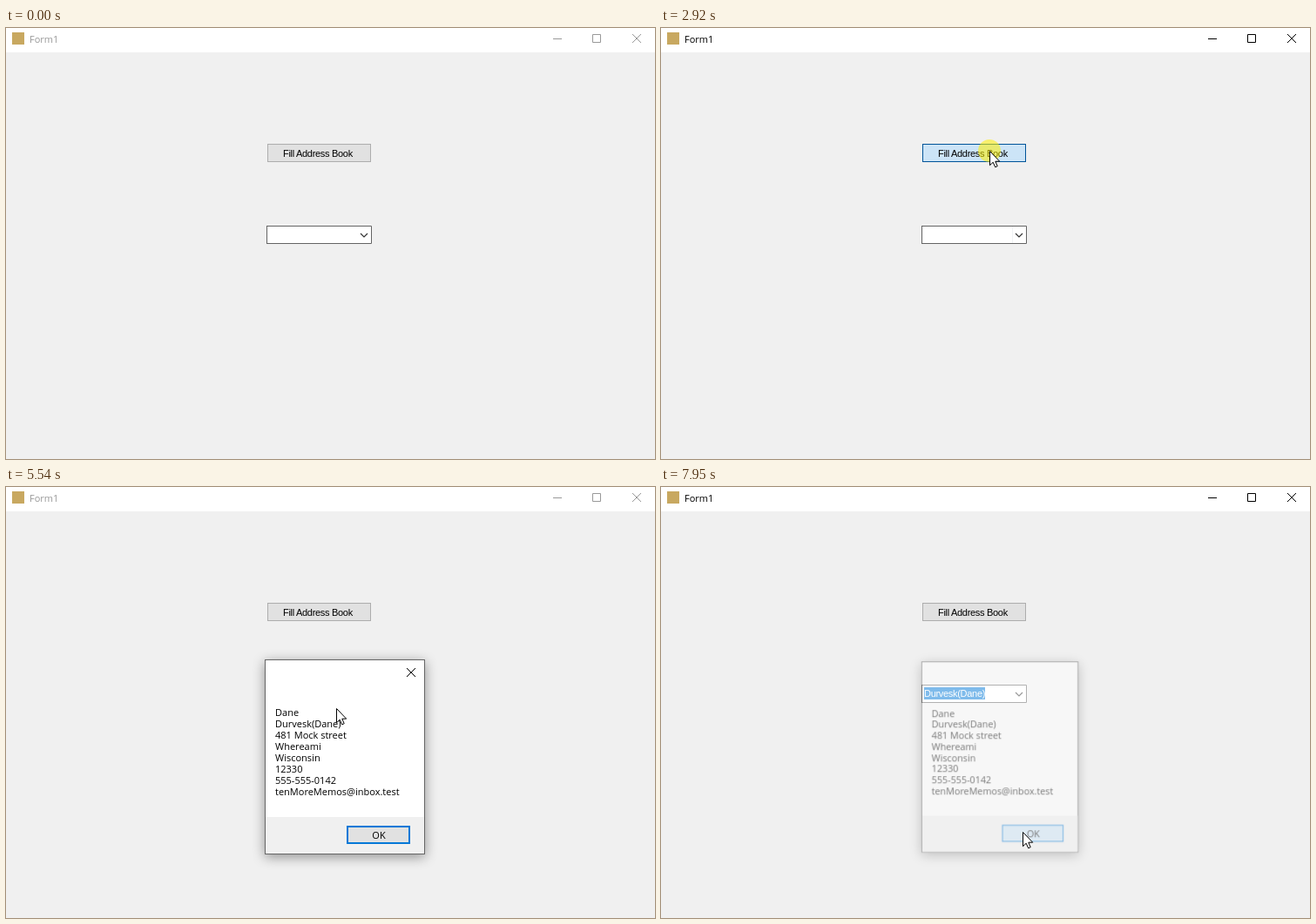
Write an HTML page that moves like this. It is 745 px wide and 495 px high and loops after 8 s.

```html
<!DOCTYPE html>
<html lang="en">
<head>
<meta charset="utf-8">
<title>Form1</title>
<style>
  html, body { margin: 0; width: 100%; height: 100%; overflow: hidden; background: #f0f0f0; }
  svg { display: block; width: 100vw; height: 100vh; }
  text { font: 11px "Open Sans", "Noto Sans", sans-serif; white-space: pre; }
  .control { font: 11px "Liberation Sans", Arial, sans-serif; letter-spacing: -.3px; }
  .line { fill: none; stroke: currentColor; }
  #dropdown, #dialog, #halo, #selection, #cursor { opacity: 0; }
  #dropdown { filter: drop-shadow(2.5px 2.5px 1px rgba(0, 0, 0, .55)); }
  #dialog { transform-origin: 389px 310px; filter: drop-shadow(0 3px 7px rgba(0, 0, 0, .4)); }
</style>
</head>
<body>
<svg viewBox="0 0 745 495">
  <rect width="745" height="495" fill="#f0f0f0"/>
  <rect width="745" height="28" fill="#fff"/>
  <rect x="7" y="5" width="14" height="14" fill="#c8a860"/>
  <g id="titlebar" color="#999">
    <text x="27" y="17" fill="currentColor">Form1</text>
    <path class="line" d="M628 12.5h10M673.5 7.5h9v9h-9zM719 7l10 10M729 7l-10 10"/>
  </g>

  <rect id="fillButton" x="300.5" y="133.5" width="118" height="20" fill="#e1e1e1" stroke="#adadad"/>
  <text class="control" x="318" y="148">Fill Address Book</text>

  <rect x="299.5" y="227.5" width="120" height="20" fill="#fff" stroke="#646464"/>
  <rect id="arrowButton" x="403.5" y="227.5" width="16" height="20" fill="#fff" stroke="#fff"/>
  <path d="M403 227.5h16.5v20H403" fill="none" stroke="#646464"/>
  <path d="M407 236l4 4 4-4" fill="none" stroke="#333" stroke-width="1.2"/>
  <g id="selection">
    <rect x="302" y="230" width="70" height="14" fill="#0078d7"/>
    <text class="control" x="302" y="241" fill="#fff">Durvesk(Dane)</text>
  </g>

  <g id="dropdown">
    <rect id="list" x="299.5" y="247.5" width="120" height="14" fill="#fff" stroke="#555"/>
    <g id="items" opacity="0">
      <rect id="highlight" x="300" y="248" width="119" height="14" fill="#0078d7" opacity="0"/>
      <text id="firstItem" class="control" x="302" y="260">Durvesk(Dane)</text>
      <text class="control" x="302" y="273">Durvesk(Petra)</text>
    </g>
  </g>

  <g id="dialog">
    <rect x="297.5" y="198.5" width="183" height="223" fill="#fff" stroke="#666"/>
    <rect x="298" y="379" width="182" height="42" fill="#f0f0f0"/>
    <path id="dialogClose" d="M460 208l10 10M470 208l-10 10" stroke="#000"/>
    <g id="message"></g>
    <rect id="okButton" x="392" y="390" width="71" height="19" fill="#e1e1e1" stroke="#0078d7" stroke-width="2"/>
    <text x="428" y="404" text-anchor="middle">OK</text>
  </g>

  <g id="cursor">
    <circle id="halo" r="13" fill="#ffee00" fill-opacity=".55"/>
    <path d="M.5 .5v16.2l3.7-3.5 2.5 5.6 2.5-1.1-2.4-5.5h4.9z" fill="#fff" stroke="#000"/>
  </g>
</svg>

<script>
const LOOP = 8000;
const $ = id => document.getElementById(id);

const lines = ["Dane", "Durvesk(Dane)", "481 Mock street", "Whereami", "Wisconsin",
  "12330", "555-555-0142", "tenMoreMemos@inbox.test"];
$("message").innerHTML = lines
  .map((line, i) => `<text x="309" y="${263 + 13 * i}">${line}</text>`).join("");

// Each row is [time, properties, easing to the next row]; rows hold by default.
function play(id, rows) {
  const frames = rows.map(([t, props, easing = "steps(1)"]) => ({ offset: t / LOOP, easing, ...props }));
  frames.push({ offset: 1, ...rows.at(-1)[1] });
  $(id).animate(frames, { duration: LOOP, iterations: Infinity });
}
const track = (id, name, rows) =>
  play(id, rows.map(([t, value, easing]) => [t, { [name]: value }, easing]));
const toggle = (id, ...times) =>
  track(id, "opacity", [[0, 0], ...times.map((t, i) => [t, (i + 1) % 2])]);
const jumps = n => `steps(${n}, jump-both)`;

const at = (t, x, y, easing) => [t, `translate(${x}px, ${y}px)`, easing];
track("cursor", "transform", [
  at(0, 639, 389), at(50, 639, 389, "steps(3)"), at(230, 622, 336),
  at(430, 622, 336, jumps(12)), at(1170, 418, 239),
  at(2370, 418, 239, jumps(8)), at(2860, 377, 141),
  at(3360, 377, 141, jumps(6)), at(3740, 427, 205, "steps(4)"),
  at(3990, 418, 246, "steps(2)"), at(4120, 411, 243),
  at(4600, 395, 250), at(4670, 379, 254),
  at(5790, 379, 254, jumps(3)), at(5970, 328, 258),
  at(6220, 316, 254, "steps(4)"), at(6470, 352, 341),
  at(6590, 352, 341, jumps(3)), at(6780, 408, 354),
  at(7450, 408, 354, jumps(3)), at(7640, 415, 396),
]);
toggle("cursor", 50);
toggle("halo", 1300, 1540, 2920, 3110, 4170, 4600, 5110, 5180, 6410, 6590, 7760, 7880);

track("titlebar", "color", [[0, "#999"], [1300, "#000"], [5240, "#999"], [7950, "#000"]]);

const look = (fill, stroke, extra) => ({ fill, stroke, ...extra });
const rest = look("#e1e1e1", "#adadad");
const hover = look("#e5f1fb", "#0078d7");
const pressed = look("#cce4f7", "#005499");
play("fillButton", [
  [0, rest], [2680, hover], [2920, pressed], [3110, hover],
  [3550, hover, "steps(5)"], [3860, rest],
]);

const plain = look("#fff", "#fff");
const warm = look("#f4f9fd", "#c4d8ea");
const faint = look("#fff", "#f0f3f5");
play("arrowButton", [
  [0, plain], [50, plain, "steps(3)"], [230, warm],
  [1300, pressed], [1920, pressed, jumps(4)], [2170, warm],
  [2430, warm, "steps(6)"], [2860, faint], [3110, plain],
  [3990, warm], [4170, pressed], [5180, plain],
]);

toggle("dropdown", 1360, 1920, 4230, 5180);
track("list", "height", [[0, "14px"], [4290, "28px"]]);
toggle("items", 4290);
toggle("highlight", 4600);
track("firstItem", "fill", [[0, "#000"], [4600, "#fff"]]);
toggle("selection", 5180);

const pose = (opacity, scale) => ({ opacity, transform: `scale(${scale})` });
play("dialog", [
  [0, pose(0, .9)], [5240, pose(.15, .92), "steps(5)"], [5540, pose(1, 1)], [7950, pose(.5, .98)],
]);
track("dialogClose", "opacity", [[0, 1], [7950, 0]]);

const border = width => ({ strokeWidth: `${width}px` });
play("okButton", [
  [0, look("#e1e1e1", "#0078d7", border(2))],
  [7640, look("#e5f1fb", "#0078d7", border(1))],
  [7760, look("#cce4f7", "#005499", border(1))],
  [7880, look("#cce4f7", "#0078d7", border(1))],
]);
</script>
</body>
</html>
```
